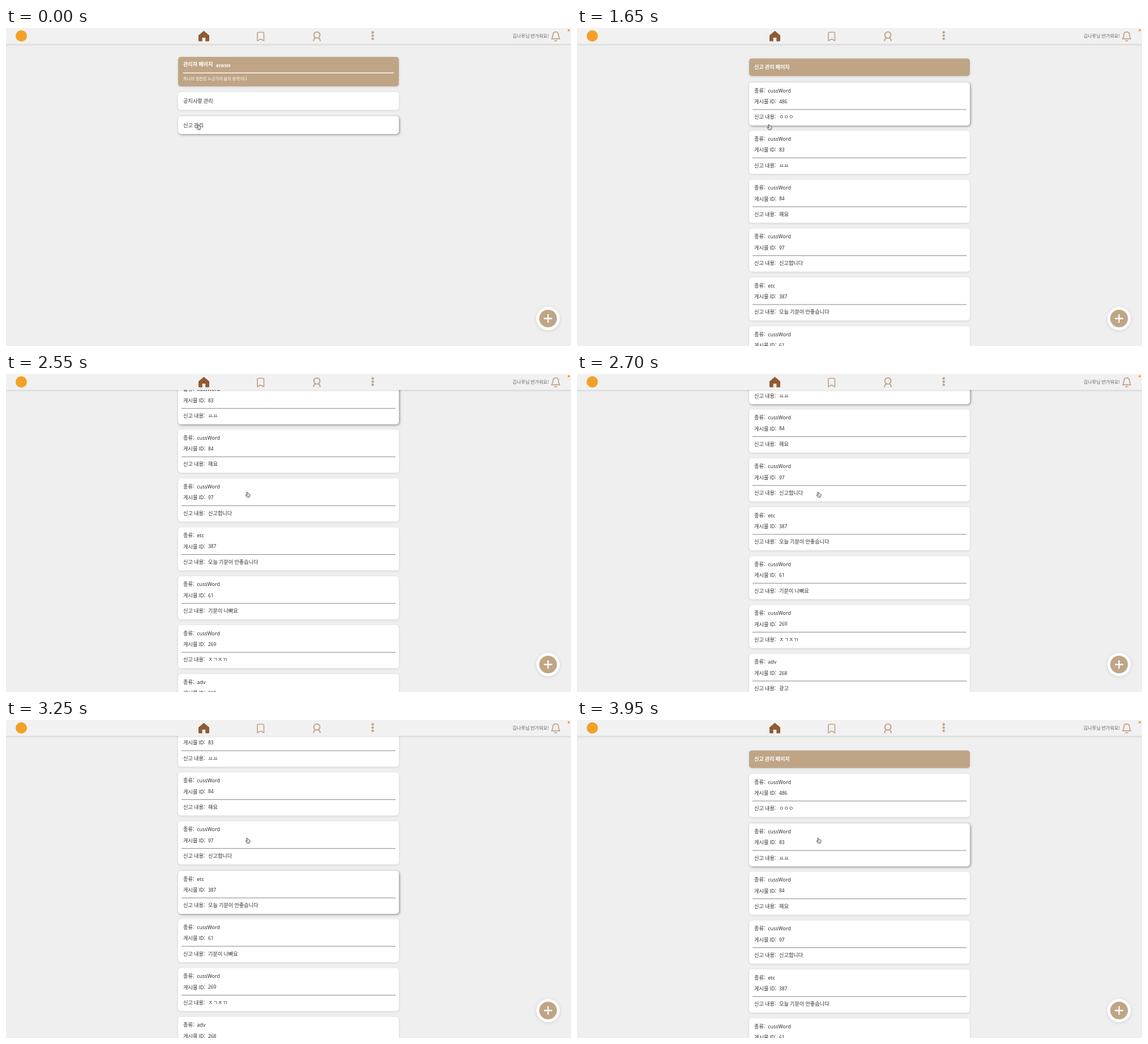
An HTML page with a canvas for the animation above (4590 ms loop, 998x561 px).

```html
<!DOCTYPE html>
<html lang="ko">
<head>
<meta charset="utf-8">
<title>신고 관리</title>
<style>
html, body { margin: 0; width: 100%; height: 100%; overflow: hidden; background: #efefef; }
canvas { display: block; width: 998px; height: 561px; }
</style>
</head>
<body>
<canvas id="stage" width="998" height="561"></canvas>
<script>
const ctx = document.getElementById('stage').getContext('2d');
const LOOP = 4590, STEP = 50, OPEN_AT = 1650;
const TAN = '#bfa586', BROWN = '#8f5b33', INK = '#303030';
const KOREAN = '"Noto Sans CJK KR", "Noto Sans CJK", sans-serif';
const LATIN = '"Noto Sans", sans-serif';
const LEFT = 304, WIDTH = 390, FIRST_TOP = 95, PITCH = 86.25;

const reports = [
  ['cussWord', '486', 'ㅇㅇㅇ'], ['cussWord', '83', 'ㅛㅛ'], ['cussWord', '84', '해요'],
  ['cussWord', '97', '신고합니다'], ['etc', '387', '오늘 기분이 안좋습니다'],
  ['cussWord', '61', '기분이 나빠요'], ['cussWord', '269', 'ㅈㄱㅈㄲ'],
  ['adv', '268', '광고'], ['cussWord', '433', '기분 매우 나빠요']
];

// [time, scroll offset], including the elastic bounce at both ends
const scrollKeys = [
  [2200, 0], [2250, 8], [2300, 34], [2350, 67.7], [2450, 126], [2550, 169.4], [2650, 198],
  [2750, 212], [2800, 234], [2850, 278], [2900, 308], [2950, 310], [3100, 304], [3150, 304],
  [3200, 260], [3300, 90], [3350, 36], [3400, 6], [3450, -3.7], [3500, -5.5],
  [3600, -3], [3700, -0.7], [3750, 0]
];
const hoverKeys = [[0, 0], [2050, 1], [2750, 3], [3150, 4], [3950, 1]];

function interpolate(keys, t) {
  if (t <= keys[0][0]) return keys[0][1];
  for (let i = 1; i < keys.length; i++) {
    const [t0, v0] = keys[i - 1], [t1, v1] = keys[i];
    if (t <= t1) return v0 + (v1 - v0) * (t - t0) / (t1 - t0);
  }
  return keys[keys.length - 1][1];
}

const latest = (keys, t) => keys.filter(k => k[0] <= t).pop()[1];

function text(str, x, middle, size, color, family = KOREAN, weight = 400) {
  ctx.font = `${weight} ${size}px ${family}`;
  ctx.fillStyle = color;
  ctx.fillText(str, x, middle + size * 0.36);
}

function shadow(color, blur, dx, dy) {
  ctx.shadowColor = color;
  ctx.shadowBlur = blur;
  ctx.shadowOffsetX = dx;
  ctx.shadowOffsetY = dy;
}

function box(top, height, color, raised) {
  ctx.save();
  if (raised) shadow('rgba(0,0,0,.42)', 4, 1.3, 1.3);
  else shadow('rgba(0,0,0,.12)', 4, 0, 1);
  ctx.fillStyle = color;
  ctx.beginPath();
  ctx.roundRect(LEFT, top, WIDTH, height, 5);
  ctx.fill();
  ctx.restore();
}

function disc(x, y, r, color) {
  ctx.fillStyle = color;
  ctx.beginPath();
  ctx.arc(x, y, r, 0, Math.PI * 2);
  ctx.fill();
}

function outline(path, color, width) {
  ctx.strokeStyle = color;
  ctx.lineWidth = width;
  ctx.lineJoin = ctx.lineCap = 'round';
  ctx.stroke(new Path2D(path));
}

function drawHome() {
  box(51, 52, TAN, false);
  text('관리자 페이지', 313, 63.5, 9.1, '#fff', KOREAN, 700);
  text('#SW309', 371, 66.3, 6.6, '#fff', LATIN, 600);
  ctx.fillStyle = '#fff';
  ctx.fillRect(313, 78.6, 372, 1.4);
  text('하나의 칭찬은 누군가의 삶의 동력이다', 313, 89.7, 7.25, '#fff', KOREAN, 500);
  box(113, 31.5, '#fff', false);
  text('공지사항 관리', 313, 128.5, 9.2, INK, KOREAN, 500);
  box(155.5, 31.5, '#fff', true);
  text('신고 관리', 313, 171.3, 9.2, INK, KOREAN, 500);
}

function drawReport([kind, id, note], top, raised) {
  box(top, 76, '#fff', raised);
  text('종류:', 313, top + 14.3, 9.2, INK);
  text(kind, 337.3, top + 14.3, 8.9, INK, LATIN);
  text('게시물 ID:', 313, top + 33.8, 9.2, INK);
  text(id, 357, top + 33.8, 8.4, INK, LATIN);
  ctx.fillStyle = '#858585';
  ctx.fillRect(310, top + 47.4, 378, 1);
  text('신고 내용:', 313, top + 61, 9.2, INK);
  text(note, 357, top + 61, 9.2, INK);
}

function drawReports(t) {
  const scroll = interpolate(scrollKeys, t);
  const hovered = latest(hoverKeys, t);
  box(53.7 - scroll, 31, TAN, false);
  text('신고 관리 페이지', 313, 69 - scroll, 9.1, '#fff', KOREAN, 700);
  reports.forEach((report, i) => {
    const raised = i === hovered;
    const top = FIRST_TOP + i * PITCH - scroll + (raised ? 1 : 0);
    if (top < 561) drawReport(report, top, raised);
  });
}

function drawNav() {
  ctx.save();
  shadow('rgba(0,0,0,.16)', 4, 0, 1);
  ctx.fillStyle = '#f1f1f1';
  ctx.fillRect(-10, -10, 1018, 38);
  ctx.restore();

  disc(27, 14, 10, '#f2a128');

  ctx.fillStyle = BROWN;
  ctx.fill(new Path2D('M349.5 5 L359 13 V22 Q359 23.5 357.5 23.5 H352.3 V17 H346.7 V23.5 H341.5 Q340 23.5 340 22 V13 Z'));
  outline('M444 22.5 V9.5 Q444 7.5 446 7.5 H453.5 Q455.5 7.5 455.5 9.5 V22.5 L449.8 19.4 Z', TAN, 1.7);
  outline('M554.5 12.3 A5.4 5.4 0 1 1 543.7 12.3 A5.4 5.4 0 1 1 554.5 12.3 M543.2 22.3 Q544 17.8 547 17.4 M555 22.3 Q554.2 17.8 551.2 17.4', TAN, 2);
  for (const y of [7.8, 13.4, 19]) disc(647.7, y, 2.2, TAN);
  text('김나루님 반가워요!', 894.8, 14.4, 8.1, '#666');
  outline('M963.8 19.2 H978.2 Q976 16.5 976 12.5 Q976 7 971 6.8 Q966 7 966 12.5 Q966 16.5 963.8 19.2 Z M969.2 22.2 Q971 23.4 972.8 22.2', TAN, 1.8);
  disc(994, 4, 1.9, '#f59a23');
}

function drawAddButton() {
  ctx.save();
  shadow('rgba(0,0,0,.12)', 6, 0, 1);
  disc(957.5, 512.5, 20.7, '#fff');
  ctx.restore();
  disc(957.5, 512.5, 15.6, TAN);
  outline('M957.5 506 V519 M951 512.5 H964', '#fff', 2.3);
}

function drawCursor(t) {
  const move = interpolate([[1950, 0], [2000, 0.3], [2050, 0.8], [2100, 1]], t);
  ctx.save();
  ctx.translate(340 + 87 * move, 174.7 + 38 * move);
  const hand = 'M-2 -4.2 Q-1.3 -5.2 -.5 -4.1 L.3 -1.7 Q1 -2.2 1.6 -1.5 Q2.4 -1.8 2.8 -1 Q3.9 -1.1 4 .3 L3.7 2.5 L2.7 4.6 H-1.2 L-3.6 1.2 Q-3.8 .1 -2.7 .2 L-1.2 1.1 Z';
  ctx.fillStyle = '#fff';
  ctx.fill(new Path2D(hand));
  outline(hand, '#333', 0.9);
  outline('M.4 1.4 V3.2 M1.7 1.4 V3.2', '#555', 0.5);
  ctx.restore();
}

function render(now) {
  const t = Math.floor((now % LOOP) / STEP) * STEP;
  ctx.fillStyle = '#efefef';
  ctx.fillRect(0, 0, 998, 561);
  if (t < OPEN_AT) drawHome();
  else drawReports(t);
  drawNav();
  drawAddButton();
  drawCursor(t);
}

const start = performance.now();
function tick() {
  render(performance.now() - start);
  requestAnimationFrame(tick);
}
tick();
</script>
</body>
</html>
```
